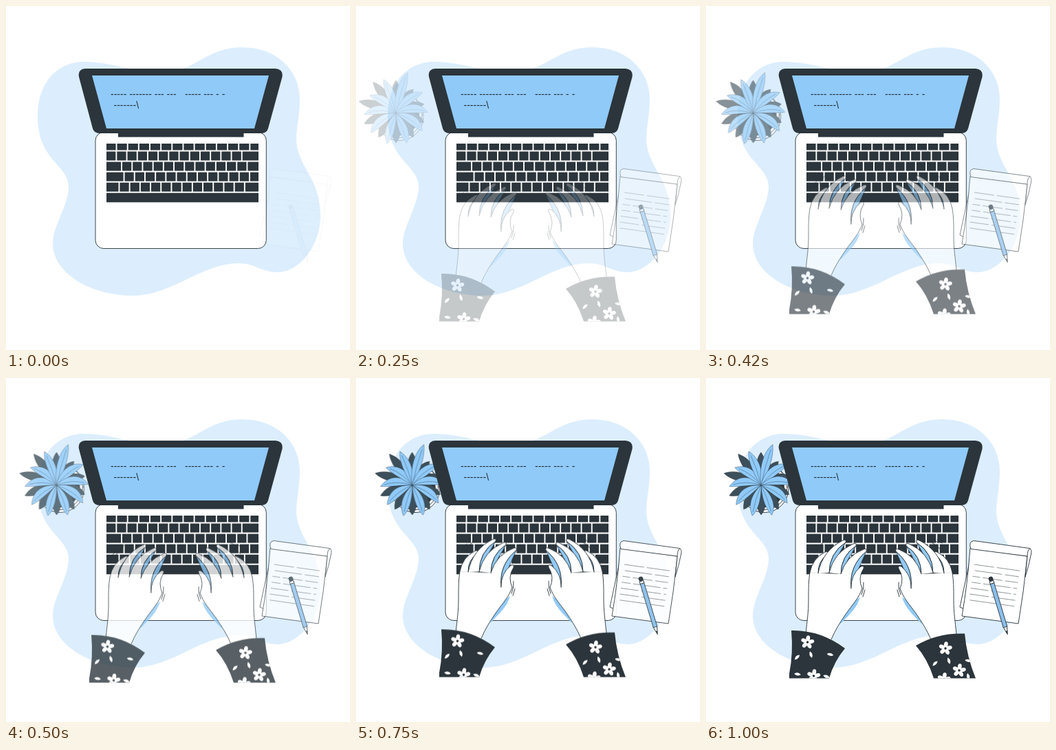
An HTML page for the animation above (1040 ms loop, 500 by 500 pixels).

```html
<!DOCTYPE html>
<html lang="en">
<head>
<meta charset="utf-8">
<title>Typing on a laptop</title>
<style>
  html, body { margin: 0; width: 100%; height: 100%; overflow: hidden; background: #fff; }
  svg { display: block; width: 100%; height: 100%; }
  text { font: 14px "Liberation Sans", Arial, sans-serif; fill: #263238; white-space: pre; }
  .dark { fill: #2b353b; }
  .blue { fill: #90caf9; }
  .white { fill: #fff; }
  .line { fill: none; stroke: #263238; stroke-width: .9; stroke-linecap: round; stroke-linejoin: round; }
  .paper { fill: #fff; stroke: #263238; stroke-width: .9; stroke-linejoin: round; }
  .shade { fill: #90caf9; stroke: #263238; stroke-width: .7; }
  .ruled { fill: none; stroke: #858b8e; stroke-width: .9; stroke-dasharray: 29 4 40 4; }
  .leaf { stroke: #263238; stroke-width: .4; stroke-linejoin: round; }
  .back { fill: #3d4f59; }
  .rib { fill: none; stroke: #35566e; stroke-width: .5; }
</style>
</head>
<body>
<svg viewBox="0 0 500 500">
  <defs>
    <clipPath id="cuffL"><path d="M124 367Q166 366 202 393Q186 412 179 436.500H121V430Q127 400 124 367Z"/></clipPath>
    <clipPath id="cuffR"><path d="M376 371.500Q336 370 305 389Q322 408 331 436.500H392Q379 405 376 371.500Z"/></clipPath>
    <g id="hand">
      <path class="blue" d="M224 318C220 334 208 344 197 356L190 358L212 328Z"/>
      <path class="white" d="M145 372C147 352 149 342 149 322C149 305 149 295 151 283L196 285L211 306H227C222 320 214 328 204 342C195 355 188 366 182 380Z"/>
      <path class="line" d="M145 372C147 352 149 342 149 322C149 305 149 295 151 283M227 306C222 320 214 328 204 342C195 355 188 366 182 380M229 297Q230 306 226 315M231 308L228 318"/>
      <g id="fingers"></g>
    </g>
  </defs>

  <path fill="#dceefd" d="M46 160C46 108 78 81 113 81C155 81 185 97 225 97C275 97 290 60 343 60C395 60 427 95 427 135C427 160 422 175 422 195C424 235 457 250 457 305C457 350 425 387 395 387C372 387 362 374 338 374C285 374 240 421 185 421C125 421 68 390 68 345C68 320 91 290 91 262C90 230 46 225 46 160Z"/>

  <g id="plant">
    <circle class="paper" cx="85" cy="160.500" r="35"/>
    <circle class="line" cx="85" cy="158.500" r="33"/>
    <circle class="dark" cx="85" cy="159" r="29"/>
    <g id="leaves"></g>
  </g>

  <g id="laptop">
    <rect class="paper" x="130" y="183.500" width="248.300" height="169" rx="12"/>
    <path class="dark" d="M115 91H392Q403 92 401.500 103L381 178Q379 185 371 185H136Q128 185 126 178L106 103Q104 92 115 91Z"/>
    <path class="blue" d="M125 101H382L361 178H146Z"/>
    <rect class="dark" x="163" y="184" width="182.500" height="6.500"/>
    <text x="152" y="133.200">----- ------- --- ---</text>
    <text x="260" y="133.200">----- --- - -</text>
    <text x="156.500" y="149.200">-------\</text>
    <g id="keys" class="dark"></g>
  </g>

  <g id="notes">
    <path class="paper" d="M385 258L369 333L376 336Z"/>
    <path class="paper" d="M384 247L467 259Q462 310 454 357L372 346Q380 300 384 247Z"/>
    <path class="paper" d="M385 248.500Q381 238 389 236.500L470 247.500Q474 249 472.500 256Q469 274 464 289Q466 272 467 259Z"/>
    <path class="line" d="M467 259Q467 249 471 248"/>
    <g id="rules"></g>
    <g transform="translate(414 292) rotate(-16.700)">
      <path class="paper" d="M-2.900 72L0 84L2.900 72Z"/>
      <path class="dark" d="M-1.500 79L0 84.500L1.500 79Z"/>
      <rect x="-2.900" y="4" width="5.800" height="69" fill="#8abfeb" stroke="#263238" stroke-width=".8"/>
      <rect class="paper" x="-2.900" y="3" width="5.800" height="4"/>
      <rect class="dark" x="-3.300" y="-3.300" width="6.600" height="7" rx="3"/>
    </g>
  </g>

  <g id="hands">
    <use href="#hand"/>
    <use href="#hand" transform="translate(509 0) scale(-1 1)"/>
    <path class="line" stroke-width=".7" d="M154 252L161 243M158 254L162 248M164 247L172 236M325 232L337 239M327 238L341 249M336 235L343 240"/>
    <g clip-path="url(#cuffL)"><rect class="dark" x="115" y="360" width="95" height="80"/><g id="printL"></g></g>
    <g clip-path="url(#cuffR)"><rect class="dark" x="300" y="365" width="95" height="75"/><g id="printR"></g></g>
  </g>
</svg>

<script>
const $ = id => document.getElementById(id);

function add(parent, tag, attrs) {
  const el = document.createElementNS("http://www.w3.org/2000/svg", tag);
  for (const name in attrs) el.setAttribute(name, attrs[name]);
  return parent.appendChild(el);
}

// Keyboard: a first key, equal keys at one pitch, and a last key that fills the row.
const LEFT = 146, RIGHT = 367, GAP = 1.9;
function keyRow(y, height, first, pitch) {
  let x = LEFT, next = LEFT + first;
  for (let i = 0; i < 14; i++) {
    if (i === 13 || next + pitch * .6 > RIGHT) next = RIGHT + GAP;
    add($("keys"), "rect", { x, y, width: next - GAP - x, height });
    if (next > RIGHT) break;
    x = next;
    next += pitch;
    if (next + pitch * .7 > RIGHT && RIGHT - x < pitch * 1.5) next = RIGHT + GAP;
  }
}
keyRow(200, 9.5, 15.5, 16.15);
[15.3, 23, 26.5, 19.4].forEach((first, i) => keyRow(211.5 + 15.07 * i, 13, first, 15.2));
add($("keys"), "rect", { x: LEFT, y: 271.7, width: RIGHT - LEFT, height: 13.6 });

// Leaves: two rings of ten around the heart, the front ring turned by half a step.
const HEART = { x: 80, y: 156 };
const rad = deg => deg * Math.PI / 180;
const lobe = (deg, peak, power) => Math.max(0, Math.cos(rad(deg - peak))) ** power;
function leaf(kind, deg, len, w, bend) {
  const c = Math.cos(rad(deg)), s = Math.sin(rad(deg));
  const at = (along, side) =>
    `${(HEART.x + c * along * len - s * side).toFixed(1)} ${(HEART.y + s * along * len + c * side).toFixed(1)}`;
  add($("leaves"), "path", { class: `leaf ${kind}`,
    d: `M${at(0, 0)}C${at(.3, bend + w * .7)} ${at(.7, bend + w)} ${at(1, 0)}C${at(.75, bend - w)} ${at(.3, bend - w * .7)} ${at(0, 0)}Z` });
  add($("leaves"), "path", { class: "rib", d: `M${at(0, 0)}Q${at(.45, bend)} ${at(.88, bend * .3)}` });
}
for (let i = 0; i < 10; i++) {
  const deg = -18 - 36 * i;
  leaf("back", deg, 43 + 15 * lobe(deg, -145, 2), 10, -3 * Math.cos(rad(deg)));
}
for (let i = 9; i >= 0; i--) {
  const deg = -2 - 36 * i;
  leaf("blue", deg, 46 + 16 * lobe(deg, -79, 6), 9.5, -8 * Math.cos(rad(deg)));
}

// Fingers arch from one crotch to a tip and back to the next, each casting a blue shade.
const crotches = [[151, 283], [163, 284], [179, 283], [196, 285], [211, 306], [227, 306]];
const tips = [[177, 253], [203, 236], [218, 241], [233, 249], [229, 274]];
function arch(low, high, curve) {
  const dx = high[0] - low[0], dy = high[1] - low[1];
  return [low[0] + dx / 2 + dy * curve, low[1] + dy / 2 - dx * curve];
}
tips.forEach((tip, i) => {
  const from = crotches[i], to = crotches[i + 1], [x, y] = tip;
  const left = [x - 4, y], right = [x, y + 3];
  const inner = arch(to, right, .27);
  if (i < 4) add($("fingers"), "path", { class: "shade", d: `M${to}Q${inner} ${right}Q${arch(to, right, .03)} ${to}Z` });
  add($("fingers"), "path", { class: "paper",
    d: `M${from}Q${arch(from, left, .25)} ${left}Q${[x + 1.5, y - 2]} ${right}Q${inner} ${to}` });
});

for (let i = 0; i < 7; i++) {
  const x = 390 - 1.3 * i, y = 271 + 8.6 * i;
  add($("rules"), "path", { class: "ruled", "stroke-dashoffset": i * 31, d: `M${x} ${y}l66 9.2` });
}

// Sleeve print
function flower(parent, x, y) {
  for (let i = 0; i < 5; i++)
    add(parent, "ellipse", { class: "white", rx: 2.9, ry: 4.3, cy: -5.6,
      transform: `translate(${x} ${y}) rotate(${8 + i * 72})` });
  add(parent, "circle", { class: "white", cx: x, cy: y, r: 3.6 });
  add(parent, "circle", { class: "dark", cx: x, cy: y, r: 1.8 });
}
function sprig(parent, x, y, turn) {
  add(parent, "path", { class: "white", d: "M-5 0Q0 -4.400 5 0Q0 4 -5 0Z",
    transform: `translate(${x} ${y}) rotate(${turn})` });
}
function motif(parent, x, y) {
  flower(parent, x, y);
  sprig(parent, x - 15, y + 22, -43);
  sprig(parent, x + 5, y + 18, 73);
  sprig(parent, x + 33, y + 18, 12);
}
motif($("printL"), 147.5, 384);
flower($("printL"), 156.5, 433);
sprig($("printL"), 133, 430.5, 8);
sprig($("printL"), 175, 434, 20);
motif($("printR"), 348, 393);
flower($("printR"), 368, 425);
flower($("printR"), 346, 438);
sprig($("printR"), 381, 434, 80);

// Entrances: slides with a slight overshoot, and a fade in place.
const enter = (id, transform, easing) => $(id).animate(
  [{ opacity: 0, transform }, { opacity: 1, transform: "translate(0px, 0px)" }],
  { duration: 1000, fill: "both", easing });
const BOUNCE = "cubic-bezier(.36, -.01, .5, 1.38)";
const moves = [
  enter("plant", "translate(-30px, 0px)", BOUNCE),
  enter("hands", "translate(0px, 30px)", BOUNCE),
  enter("notes", "translate(0px, 0px)", "ease-out")
];
moves.forEach(m => m.pause());

const LOOP = 1040, RATE = 24, LEAD = 22;
const start = performance.now();
function draw() {
  const t = (performance.now() - start) % LOOP;
  let step = Math.floor((t + 5.5) * RATE / 1000);
  if (step < 2) step = 0;
  const time = Math.min(1000, step * 1000 / RATE + LEAD);
  moves.forEach(m => { m.currentTime = time; });
  requestAnimationFrame(draw);
}
draw();
</script>
</body>
</html>
```
